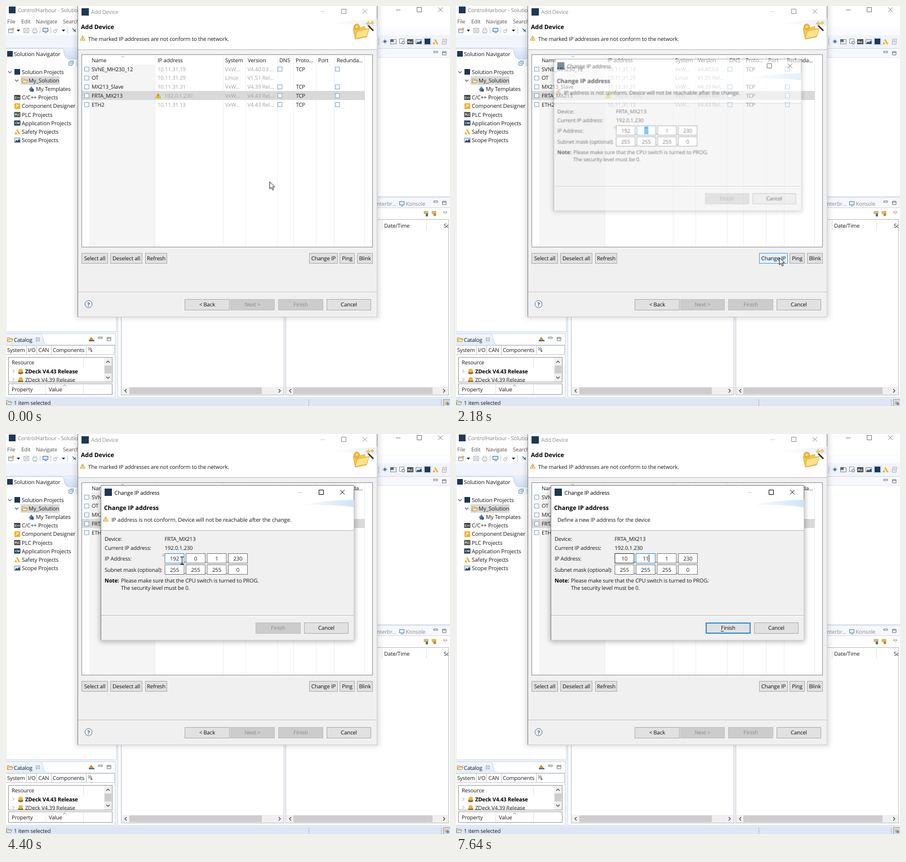
An HTML page that plays this animation: 788x711 px, repeating every 8 s.

```html
<!DOCTYPE html>
<html lang="en">
<head>
<meta charset="utf-8">
<title>Change IP address</title>
<style>
html,body{margin:0;width:100%;height:100%;overflow:hidden;background:#fff}
svg{display:block;width:100vw;height:100vh}
text{font:9.6px "Open Sans","Noto Sans",sans-serif;letter-spacing:-.15px;white-space:pre;text-rendering:geometricPrecision}
.b{font-weight:700}
.h{font-weight:700;font-size:10.7px;letter-spacing:0}
.tree{font-size:9.8px;letter-spacing:-.12px}
.mini{font-size:5.5px;font-weight:700;letter-spacing:-.3px}
.m{text-anchor:middle}
.s{animation:8s step-end infinite}
.title{animation-name:title}
.row{animation-name:row}
.change{animation-name:change}
.f0{animation-name:first}
.f1{animation-name:second}
.f5{animation-name:mask}
.caret{animation-name:caret}
.pop{animation:pop 8s linear infinite;transform-origin:393px 229px}
.ready{animation:ready 8s linear infinite}
.mouse{animation:mouse 8s ease-in-out infinite}
@keyframes title{0%{color:#8f8f8f}9.625%{color:#000}25.125%{color:#8f8f8f}}
@keyframes row{0%{fill:#d9d9d9;stroke:#d9d9d9}6.75%{fill:#cce8ff;stroke:#a9d8ff}15.5%{fill:#cce8ff;stroke:#cce8ff}25.125%{fill:#d9d9d9;stroke:#d9d9d9}}
@keyframes change{0%{fill:#e1e1e1;stroke:#adadad}22.25%{fill:#e5f1fb;stroke:#4a9fe3}25.125%{fill:#cce4f7;stroke:#3f7fb5}26.125%{fill:#e5f1fb;stroke:#4a9fe3}28%{fill:#e1e1e1;stroke:#adadad}}
@keyframes first{0%{stroke:#7a7a7a}42.5%{stroke:#333}46.375%{stroke:#2b8ddd}83%{stroke:#333}}
@keyframes second{0%{stroke:#2b8ddd}46.375%{stroke:#7a7a7a}83%{stroke:#2b8ddd}}
@keyframes mask{0%{stroke:#7a7a7a}34.75%{stroke:#333}37.6%{stroke:#7a7a7a}}
@keyframes caret{0%{opacity:0}
44.375%{opacity:1;transform:translateX(307.5px)}55%{opacity:0}
57.875%{opacity:1;transform:translateX(304.5px)}60.75%{opacity:1;transform:translateX(302px)}
65.625%{opacity:1;transform:translateX(304.5px)}72.625%{opacity:0;transform:translateX(304.5px)}
79.125%{opacity:1;transform:translateX(304.5px)}83%{opacity:1;transform:translateX(340px)}
91.875%{opacity:0;transform:translateX(340px)}93.625%{opacity:1;transform:translateX(339.5px)}95.5%{opacity:1;transform:translateX(342.5px)}}
@keyframes pop{0%,25.6%{opacity:0;transform:scale(.95)}28.5%,99.99%{opacity:1;transform:none}100%{opacity:0;transform:scale(.95)}}
@keyframes ready{0%,57.4%{opacity:0}61.75%,100%{opacity:1}}
@keyframes mouse{0%,.2%{transform:translate(467.5px,312.5px)}7.75%,13.5%{transform:translate(346px,157px)}
23.25%,29.5%{transform:translate(573.5px,447.5px)}34.75%{transform:translate(343px,243px)}
40.5%,100%{transform:translate(312.5px,225px)}}
</style>
</head>
<body>
<svg id="stage" viewBox="0 0 788 711" preserveAspectRatio="none"></svg>
<script>
const navy = '#1d3854', amber = '#f2b01e', grey = '#a3a3a3';
let css = '';

const t = (x, y, s, fill = '#1c1c1c', cls = '') => `<text x="${x}" y="${y}" fill="${fill}" class="${cls}">${s}</text>`;
const r = (x, y, w, h, fill, stroke = 'none', more = '') =>
  `<rect x="${x}" y="${y}" width="${w}" height="${h}" fill="${fill}" stroke="${stroke}" ${more}/>`;
const p = (d, stroke, fill = 'none', w = 1) => `<path d="${d}" stroke="${stroke}" fill="${fill}" stroke-width="${w}"/>`;
const c = (x, y, rad, fill, stroke = 'none') => `<circle cx="${x}" cy="${y}" r="${rad}" fill="${fill}" stroke="${stroke}"/>`;
const at = (x, y, s) => `<g transform="translate(${x} ${y})">${s}</g>`;

// Hidden at first, toggled at each of the given times in ms
let count = 0;
function on(s, ...times) {
  const name = 'k' + count++;
  css += `@keyframes ${name}{0%{opacity:0}${times.map((ms, i) => `${ms / 80}%{opacity:${1 - i % 2}}`).join('')}}`;
  return `<g class="s" style="animation-name:${name}">${s}</g>`;
}

const controls = (x, y, low, top) =>
  p(`M${x - 4} ${y + .5}h8`, low) + p(`M${x + 33.5} ${y - 4}h8v8h-8zM${x + 71} ${y - 4}l8 8m0-8l-8 8`, top);
const paneTools = (x, y) => p(`M${x - 4} ${y - 1.5}h7v2.5h-7zM${x + 11.5} ${y - 1}h6.5v6h-6.5zm0 1.5h6.5`, '#777', '#fff');
const folder = (x, y, line = '#b98a2c') => at(x, y, p('M.5 8.5V1.5h3l1 1.5h4v2M.5 8.5l2-4.5h8l-2 4.5z', line, '#fdeab4', .8));
const warn = (x, y, k = 1) => at(x, y, `<g transform="scale(${k})">` +
  p('M5 .8L9.5 9H.5z', '#e39a2d', '#fde9b6') + p('M5 3.4v2.8m0 .8v1', '#a86a10') + '</g>');
const warnRow = (x, y) => at(x, y, p('M5 .8L9.5 9H.5z', '#d9a400', '#ffd21f') + p('M5 3.2v3m0 .8v1.1', '#333'));
const check = (x, y) => r(x + .5, y - 3.5, 7.5, 7.5, '#fff', '#7ba3c9');
const badge = (x, y, s, fill) => r(x, y, 11, 9, fill) + t(x + 5.5, y + 6.6, s, '#fff', 'mini m');
const picture = (x, y) => r(x + .5, y + .5, 10, 8, '#dceaf5', '#8a93a0') + p(`M${x + 1} ${y + 8}l3-4 2 2 2.500-3.500 2 2v3.500z`, 'none', '#2b4a68');
const safety = (x, y) => p(`M${x} ${y + 9}l2.500-5 2.500 5zM${x + 3} ${y + 1}l2.500-1 5 9h-3z`, 'none', amber);
const pool = (x, y) => c(x + 5, y + 3.5, 3.8, '#f0b429') + p(`M${x + 1} ${y + 5.5}q4 3 8 0v2.500q-4 2.500-8 0z`, '#665', '#8a6a40', .7);
const shade = (x, y, w, h, strength) => r(x, y, w, h, '#000', 'none', `filter="url(#blur)" opacity="${strength}"`);

// Window frame: pale edge, darker along the left and the title bar
const frame = (x, y, w, h) => r(x, y, w, h, '#f0f0f0', '#cfcfcf') + p(`M${x} ${y + h}V${y}h${w}v25`, '#858585');

function button(x, y, w, h, label, off, cls = '') {
  return r(x + .5, y + .5, w - 1, h - 1, off ? '#cccccc' : '#e1e1e1', off ? '#bfbfbf' : '#adadad', `class="${cls}"`) +
    t(x + w / 2, y + h / 2 + 3.4, label, off ? '#8a8a8a' : '#111', 'm');
}

function hScroll(x, w, from, to) {
  return r(x, 677, w, 14, '#f0f0f0') + r(from, 678, to - from, 12, '#cdcdcd') +
    p(`M${x + 9} 681l-3 3 3 3M${x + w - 9} 681l3 3-3 3`, '#444', 'none', 1.2);
}

function workbench() {
  const menu = '#5a5a5a';
  let s = r(0, 0, 788, 711, '#f1f4fb') + r(0, 0, 788, 52, '#fff') + r(0, 36, 788, 16, '#fbfcff') +
    r(5, 1, 12, 12, navy) + t(21, 11, 'ControlHarbour - Solution', '#858585') + controls(696, 6.5, '#777', '#777') +
    t(2, 31, 'File', menu) + t(27, 31, 'Edit', menu) + t(53, 31, 'Navigate', menu) + t(101, 31, 'Search', menu);
  // toolbar
  s += p('M4.500 40.500h8v7h-8zm0 2h8', '#7a8fb0', '#fff') + c(12.5, 40.5, 2, amber) +
    p('M19 42h6l-3 3.500zM99 42h6l-3 3.500z', 'none', '#222') +
    p('M31.500 39.500h9v8h-9zm2 0v3h5v-3m-5 8v-3h5v3M47 42.500h8v4h-8zm1.500 0v-3h5v3m-5 4v2h5v-2', '#b5b5b5') +
    p('M65.500 39.500h9v6h-9zm3 8h4', '#3c72a8', '#d7e9f8') + p('M84 46l6-6m-4 7l6-6', '#aaa') + c(87, 45, 2.5, '#fff', '#aaa') +
    p('M118 40l6 6m-4-1l4-3', '#3c72a8', 'none', 1.5) +
    p('M60.500 38v11M79.500 38v11M109.500 38v11', '#bbb', 'none', .8);
  // perspective icons
  s += p('M661.500 57v13', '#bbb') + p('M668 63h9m-4.500-4.500v9m-3-7l6 5m0-5l-6 5', '#6a87a5', 'none', .8) + c(672.5, 63, 2.2, '#4d7196') +
    r(682.5, 59.5, 10, 8, '#e6eef6', '#8a93a0') + r(682, 59, 6, 5, '#666') + r(698.5, 58.5, 8, 8, '#fff', '#8a93a0') + c(705, 65, 2.6, '#d9e6f2', '#667a92') +
    badge(712, 59, 'PLC', '#4a4a4a') + picture(727, 59) + r(741, 56, 14, 14, '#cfe2f7') + r(743, 58, 10, 10, navy) +
    safety(757, 59) + p('M775 59h7l-1 9h-7zm1 3h4m-4 2h4', '#aaa');
  // navigator
  s += r(0, 75, 196, 504, '#fff', '#cfd6e6') + `<path d="M101 75h95v19h-85q-8 0-10-19" fill="url(#tab)"/>` +
    p('M0 75.500h98q5 0 6 9t9 10h83', '#c5d2e6') + r(2, 80, 10, 10, navy) + t(14, 88.5, 'Solution Navigator', '#1c1c1c', 'tree') +
    p('M111.500 99.500h6v6h-6zm2-2h6v6M113 102.500h3', '#5f92bf', '#eef5fb') + r(124, 97, 8, 10, '#dcebfa');
  s += p('M4 116l3 3 3-3M16 131l3 3 3-3', '#555', 'none', 1.1) + r(26, 125, 69, 15, '#d9d9d9') +
    r(15, 112, 10, 10, navy) + folder(28, 128) + p('M40 149l5-6 5 6zm2 0v3h7v-3', 'none', '#5e7da1') + c(47, 150, 2.5, '#33557b');
  const tree = ['My_Solution', 'My Templates', 'C/C++ Projects', 'Component Designer', 'PLC Projects', 'Application Projects', 'Safety Projects', 'Scope Projects'];
  s += t(28, 121, 'Solution Projects', '#1c1c1c', 'tree');
  tree.forEach((label, i) => s += t([40, 53][i] || 28, 136 + 15.15 * i, label, '#1c1c1c', 'tree'));
  s += badge(14.5, 158, 'C++', '#4a4a4a') + r(15, 173, 10, 10, amber) + p('M17 180l6-4m-5 0h3', '#fff', 'none', 1.3) +
    badge(14.5, 188.5, 'PLC', '#4a4a4a') + badge(14.5, 203.5, 'CM', navy) + safety(15, 219) + picture(14.5, 234);
  // catalog
  s += r(-1, 582.5, 195, 113, '#fff', '#cfd6e6') + `<path d="M0 583h60q5 0 6 10t9 10H0z" fill="url(#tab)" opacity=".6"/>` +
    p('M0 582.500h60q5 0 6 10t9 10h119', '#c5d2e6') + folder(2, 588) + t(14, 596.5, 'Catalog') + p('M54 590l5 5m0-5l-5 5M53.500 589.500h6v6h-6z', '#999', 'none', .7) +
    p('M147 594l4-6 5 6z', 'none', '#d78a2b') + r(147, 594, 10, 2, '#44688f') + paneTools(168, 590) +
    p('M0 603.500h193M0 619.500h193M36.500 604v15M54.500 604v15M80.500 604v15M142.500 604v15M192.500 604v15', '#c9c9c9') +
    t(2, 615, 'System') + t(39, 615, 'I/O') + t(57.5, 615, 'CAN') + t(83, 615, 'Components') + p('M146 607l2.500 2.500-2.500 2.500m3-5l2.500 2.500-2.500 2.500', '#222') + t(150, 614.5, '4', '#222', 'mini');
  s += r(4.5, 624.5, 184, 44, '#fff', '#9a9a9a') + t(10, 637, 'Resource') + p('M137.500 626v16', '#e3e3e3') +
    p('M11.500 646l3 3-3 3M11.500 661l3 3-3 3', '#999') + pool(21, 645) + t(34, 653, 'ZDeck V4.43 Release', '#000', 'b') +
    `<svg x="5" y="655" width="168" height="13" viewBox="5 655 168 13">${pool(21, 660) + t(34, 668, 'ZDeck V4.39 Release')}</svg>` +
    r(174, 625, 14, 43, '#f0f0f0') + r(175, 639, 12, 14, '#cdcdcd') + p('M178 634l3-3 3 3M178 659l3 3 3-3', '#444', 'none', 1.2) +
    r(4.5, 671.5, 184, 19, '#fff', '#9a9a9a') + t(10, 685, 'Property') + t(76, 685, 'Value') + p('M70.500 673v17M137.500 673v17', '#e3e3e3') + p('M101 676l3-2.500 3 2.500', '#888');
  // lower middle and right panes
  s += r(198.5, 340.5, 590, 355, '#fff', '#d3d9e8') + r(204.5, 380.5, 289, 311, '#fff', '#b9bfca') + r(496.5, 379.5, 289, 312, '#fff', '#b9bfca') +
    hScroll(205, 288, 219, 454) + hScroll(497, 288, 510, 757) +
    r(658, 341, 130, 17, '#f6f8fd') + t(655.5, 355, 'Interbr...', '#8b8b8b') + r(698.5, 347.5, 8, 6, '#e1eefa', '#4e86bd') + p('M701 355.500h4', '#4e86bd') + t(709.5, 355, 'Konsole', '#8b8b8b') +
    paneTools(763, 348) + p('M658 358.500h130', '#d3d9e8') +
    r(742, 365, 7, 4, '#e6bf55', '#a98a4d', 'stroke-width=".7"') + r(745, 369, 4, 5, '#556f8f') + r(756, 365, 7, 4, '#e6bf55', '#a98a4d', 'stroke-width=".7"') + c(761, 371, 2.5, '#c28820') + p('M776 366h7l-3.500 3.500z', '#777', '#fff', .8) +
    p('M667.500 381v18M746.500 381v18', '#e0e0e0') + t(671, 393.5, 'Date/Time') +
    `<svg x="770" y="381" width="15" height="18" viewBox="770 381 15 18">${t(777, 393.5, 'Sc')}</svg>`;
  // editor
  s += r(198.5, 75.5, 590, 263, '#fff', '#d3d9e8') + r(658, 76, 130, 15, '#f6f8fd') + paneTools(763, 82) + p('M658 91.500h130', '#dfe4f0');
  // status bar
  return s + r(0, 697, 788, 14, '#dfe5f4') + folder(0, 700, '#6f8fb5') + t(14, 708.5, '1 item selected') +
    `<path d="M537.500 700v11M772.500 700v11" stroke="#8a92a5" stroke-dasharray="1.500 1.500"/>` + r(776.5, 699.5, 12, 12, '#d3d9e8', '#9aa3b5') + r(779, 703, 6, 5, '#e2b96a') + c(784, 707, 2.5, '#7a8fa8');
}

function addDevice() {
  let s = shade(124, -8, 538, 563, .15) + on(shade(125, -4, 536, 560, .14), 770, 2010) +
    frame(127.5, -2.5, 531, 555) + r(128, 0, 530, 77, '#fff') + p('M128 77.500h530M128 508.500h530', '#bcbcbc') + p('M128 509.500h530', '#fff');
  s += r(134, 4, 13, 13, navy) + `<g class="s title">${t(151, 14, 'Add Device', 'currentColor')}${controls(562, 9.5, '#c9c9c9', 'currentColor')}</g>` +
    t(133, 41, 'Add Device', '#000', 'h') + warn(131, 52) + t(146, 62, 'The marked IP addresses are not conform to the network.');
  s += `<path d="M570 33q45-9 88-9v12q-40-5-88-3" fill="url(#sweep)" opacity=".5"/>` + at(615, 25,
    p('M1 15l8-3 3 2 10-3v5l7-1-4 15-20 4z', '#d9a63a', '#f6c645', .8) + p('M5 33l3-13 22-5-5 14z', '#d9a63a', '#ffe28a', .8) +
    c(7.5, 12, 5, '#f7b93a', '#d89320') + c(7.5, 12, 2, '#ffe08a') + p('M27 9l10 10', '#333', 'none', 2.6) + p('M25 7l3 3', '#ddd', 'none', 2.6) +
    p('M28 2l1 3 3 1-3 1-1 3-1-3-3-1 3-1zM35 2l1 2 2 1-2 1-1 2-1-2-2-1 2-1z', '#d8961d', '#ffd659', .6));
  // device table
  s += r(134.5, 86.5, 516, 342, '#fff', '#8d929b') + r(148, 104, 117, 324, '#f5f5f5') +
    p('M264.500 88v340M385.500 88v340M425.500 88v340M481.500 88v340M510.500 88v340M550.500 88v340M582.500 88v340M636.500 88v340', '#e8f1f8') +
    p('M204.500 91l2.500-2 2.500 2', '#888', 'none', .8) + r(135.5, 151.5, 501, 15, '#d9d9d9', '#d9d9d9', 'class="s row"');
  const cols = { 152: 'Name', 269: 'IP address', 389: 'System', 429: 'Version', 485: 'DNS', 514: 'Proto...', 554: 'Port', 587: 'Redunda...' };
  for (const x in cols) s += t(x, 99.5, cols[x]);
  [['SVNE_MH230_12', '10.11.31.19', 'VxW...', 'V4.40.03 ...'], ['OT', '10.11.31.29', 'Linux', 'V1.51 Rel...'],
   ['MX213_Slave', '10.11.31.31', 'VxW...', 'V4.39 Rel...'], ['FRTA_MX213', '192.0.1.230', 'VxW...', 'V4.43 Rel...'],
   ['ETH2', '10.11.31.13', 'VxW...', 'V4.43 Rel...']].forEach(([name, ip, os, ver], i) => {
    const y = 112 + 15.75 * i, bad = i === 3;
    s += check(139, y) + t(152, y + 3.6, name) + t(bad ? 281 : 269, y + 3.6, ip, grey) + t(389, y + 3.6, os, grey) + t(428.5, y + 3.6, ver, grey);
    if (bad) s += warnRow(265, y - 5);
    if (i !== 1) s += check(482, y) + t(514.5, y + 3.6, 'TCP') + check(584, y);
  });
  s += button(134, 439, 47, 19, 'Select all') + button(185, 439, 57, 19, 'Deselect all') + button(247, 439, 39, 19, 'Refresh') +
    button(538, 439, 51, 19, 'Change IP', 0, 's change') + button(592, 439, 27, 19, 'Ping') + button(623, 439, 28, 19, 'Blink');
  return s + c(146.5, 530, 6.3, '#f7f9fc', '#5d6f8c') + t(146.5, 533.6, '?', '#3c5680', 'b m') +
    button(317, 521, 80, 20, '&lt; Back') + button(398, 521, 79, 20, 'Next &gt;', 1) + button(483, 521, 80, 20, 'Finish', 1) + button(569, 521, 79, 20, 'Cancel');
}

function changeIp() {
  const mid = i => 299 + 37.5 * i;
  const field = (i, y, value, cls) => r(mid(i) - 17, y, 34, 17, '#fff', '#7a7a7a', `class="s ${cls}"`) + t(mid(i), y + 12, value, '#1c1c1c', 'm');
  const val = (i, s, ...times) => on(t(mid(i), 224.5, s, '#1c1c1c', 'm'), ...times);
  let s = shade(167, 93, 452, 276, .3) + frame(168.5, 91.5, 449, 275) +
    r(169, 92, 448, 79, '#fff') + p('M169 171.500h448M169 322.500h448', '#bcbcbc') + p('M169 323.500h448', '#fff') +
    r(175, 97, 13, 13, navy) + t(192.5, 107.5, 'Change IP address', '#000') + controls(522, 103.5, '#c9c9c9', '#000') +
    `<path d="M522 127q45-10 95-10v13q-45-6-95-3" fill="url(#sweep)"/>` + t(174, 135, 'Change IP address', '#000', 'h');
  s += on(warn(172, 146) + t(187, 155.5, 'IP address is not conform. Device will not be reachable after the change.', '#1c1c1c', 'tree') + warn(276.5, 212, .55), 0, 5250) +
    on(t(180, 155.5, 'Define a new IP address for the device'), 5250);
  s += t(175, 190, 'Device:') + t(281.5, 190, 'FRTA_MX213') + t(175, 206, 'Current IP address:') + t(281.5, 206, '192.0.1.230') +
    t(175, 224.5, 'IP Address:') + t(175, 244.5, 'Subnet mask (optional):') + t(175, 263.5, 'Note:', '#000', 'b') +
    t(204, 263.5, 'Please make sure that the CPU switch is turned to PROG.') + t(204, 276.5, 'The security level must be 0.');
  s += ['', '', '1', '230'].map((v, i) => field(i, 212.5, v, 'f' + i)).join('') +
    ['255', '255', '255', '0'].map((v, i) => field(i, 232.5, v, 'f' + (i + 4))).join('');
  for (let i = 0; i < 3; i++) s += r(mid(i) + 18, 227, 1.2, 1.2, '#333') + r(mid(i) + 18, 247, 1.2, 1.2, '#333');
  s += val(0, '192', 0, 4630) + val(0, '19', 4630, 4860) + val(0, '1', 4860, 5250) + val(0, '10', 5250) +
    val(1, '0', 0, 7490) + val(1, '1', 7490, 7640) + val(1, '11', 7640) +
    on(r(333, 214, 7, 13.5, '#0078d7') + t(mid(1), 224.5, '0', '#fff', 'm'), 0, 3550, 6640, 7490) +
    r(-.5, 214.5, 1, 13, '#000', 'none', 'class="s caret"');
  return s + button(443, 335, 80, 20, 'Finish', 1) +
    `<g class="ready">${r(444, 336, 78, 18, '#e1e1e1', '#2b8ddd', 'stroke-width="2"') + t(483, 348.4, 'Finish', '#111', 'm')}</g>` +
    on(p('M470 350.500h5', '#111', 'none', .9), 6640) + button(529, 335, 79, 20, 'Cancel');
}

const mouse = '<g class="mouse">' +
  on(p('M.5 0v12.500l2.900-2.700 2 4.800 2.200-.9-2-4.700h4z', '#000', '#fff', .9), 0, 2780) +
  on(p('M-3-6.500h2.200L0-5.800.800-6.500H3M0-6V6M-3 6.500h2.200L0 5.800.800 6.500H3', '#000', 'none', 1.1), 2780, 7490) + '</g>';

const defs = `<defs><filter id="blur" x="-10%" y="-10%" width="120%" height="120%"><feGaussianBlur stdDeviation="5"/></filter>
<linearGradient id="tab" x1="0" y1="0" x2="0" y2="1"><stop stop-color="#e9f0fb"/><stop offset="1" stop-color="#cfdff3"/></linearGradient>
<linearGradient id="sweep"><stop stop-color="#fff"/><stop offset="1" stop-color="#cfe3f5"/></linearGradient></defs>`;

const scene = defs + workbench() + addDevice() + `<g class="pop">${changeIp()}</g>` + mouse;
document.head.appendChild(document.createElement('style')).textContent = css;
document.getElementById('stage').innerHTML = scene;
</script>
</body>
</html>
```
